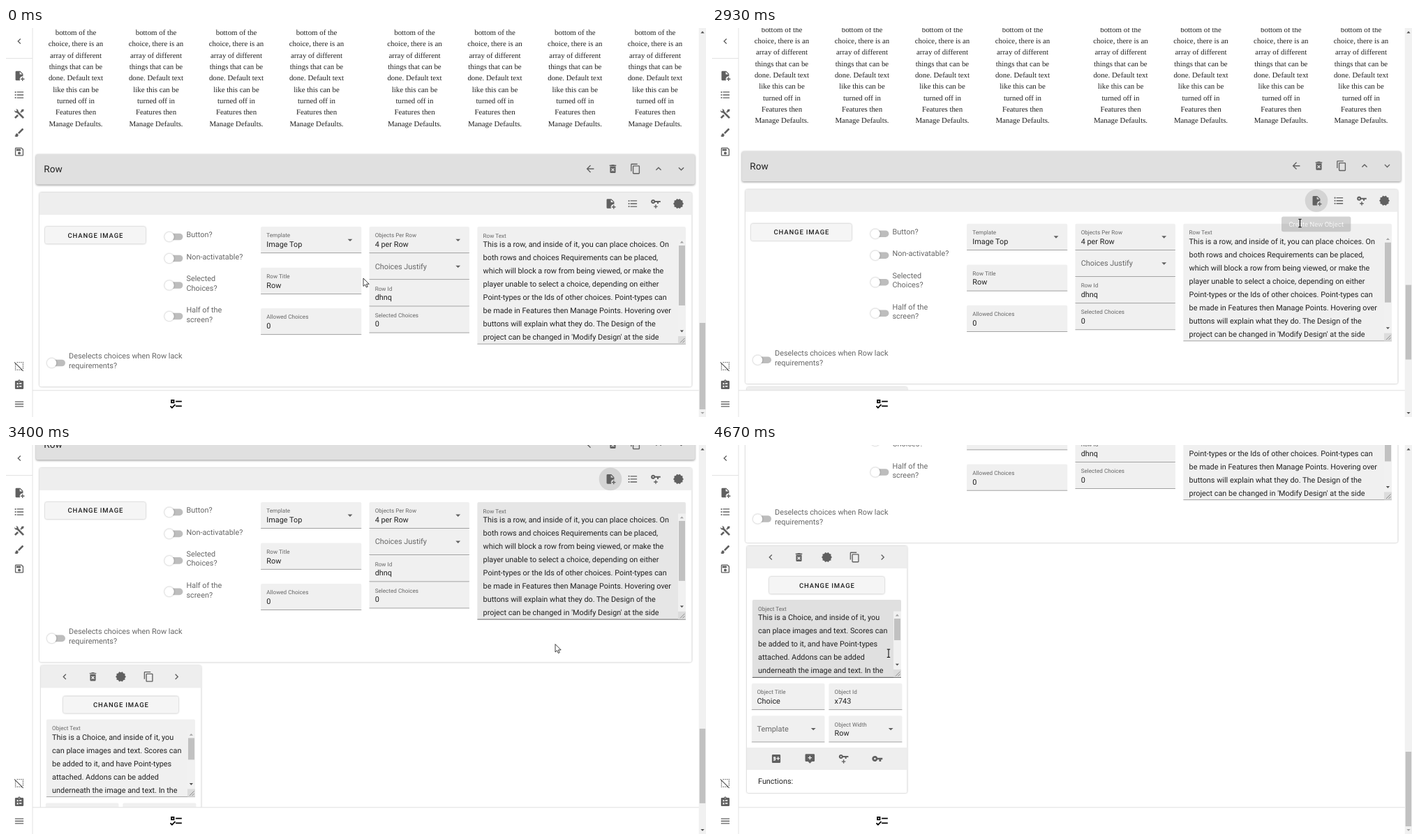
An HTML page for the animation above (5670 ms loop, 1003 by 558 pixels).

```html
<!DOCTYPE html>
<html lang="en">
<head>
<meta charset="utf-8">
<title>Adding a choice to a row</title>
<style>
  html, body { margin: 0; width: 100%; height: 100%; overflow: hidden; background: #fff; }
  svg { display: block; width: 100vw; height: 100vh; cursor: default; user-select: none; }
  text { font: 10.86px Roboto, sans-serif; fill: #212121; white-space: pre; text-rendering: geometricPrecision; }
  .label { fill: #666; }
  .small { font-size: 8.15px; fill: #666; }
  .title { font-size: 13.58px; }
  .button { font-size: 9.5px; font-weight: 500; letter-spacing: .0893em; text-anchor: middle; }
  .serif { font-family: "Liberation Serif", Times, serif; text-anchor: middle; }
  .tip { font-size: 9.5px; fill: #fff; text-anchor: middle; }
  .icon { fill: #606060; fill-rule: evenodd; }
  .low { filter: drop-shadow(0 .7px .9px rgba(0, 0, 0, .34)); }
  .high { filter: drop-shadow(0 1.5px 1.6px rgba(0, 0, 0, .42)); }
</style>
</head>
<body>
<svg id="stage" viewBox="0 0 1003 558" preserveAspectRatio="none"></svg>
<script>
const TICK = 1000 / 15, LOOP = 5670;
const CLICK_TICK = 38, CARD_Y = 374.5;

const ICONS = {
  left: 'M15.41,16.58L10.83,12L15.41,7.41L14,6L8,12L14,18Z',
  right: 'M8.59,16.58L13.17,12L8.59,7.41L10,6L16,12L10,18Z',
  up: 'M7.41,15.41L12,10.83L16.59,15.41L18,14L12,8L6,14Z',
  down: 'M7.41,8.58L12,13.17L16.59,8.58L18,10L12,16L6,10Z',
  menu: 'M3,6H21V8H3ZM3,11H21V13H3ZM3,16H21V18H3Z',
  drop: 'M7,10L12,15L17,10Z',
  back: 'M20,11V13H8L13.5,18.5L12.08,19.92L4.16,12L12.08,4.08L13.5,5.5L8,11Z',
  trash: 'M6,19A2,2 0 0,0 8,21H16A2,2 0 0,0 18,19V7H6ZM8.46,11.88L9.87,10.47L12,12.59L14.12,10.47L15.53,11.88L13.41,14L15.53,16.12L14.12,17.53L12,15.41L9.88,17.53L8.47,16.12L10.59,14ZM15.5,4L14.5,3H9.5L8.5,4H5V6H19V4Z',
  copy: 'M19,21H8V7H19M19,5H8A2,2 0 0,0 6,7V21A2,2 0 0,0 8,23H19A2,2 0 0,0 21,21V7A2,2 0 0,0 19,5M16,1H4A2,2 0 0,0 2,3V17H4V3H16Z',
  list: [6, 12, 18].map(y => `M7,${y - 1}H21V${y + 1}H7ZM2.5,${y}a1.5,1.5 0 0,1 3,0a1.5,1.5 0 0,1 -3,0Z`).join(''),
  save: 'M17,3H5A2,2 0 0,0 3,5V19A2,2 0 0,0 5,21H19A2,2 0 0,0 21,19V7ZM19,19H5V5H16.17L19,7.83ZM12,12a3,3 0 0,0 0,6a3,3 0 0,0 0,-6ZM6,6H15V10H6Z',
  brush: 'M20.71,4.63L19.37,3.29C19,2.9 18.35,2.9 17.96,3.29L9,12.25L11.75,15L20.71,6.04C21.1,5.65 21.1,5 20.71,4.63M7,14A3,3 0 0,0 4,17C4,18.31 2.84,19 2,19C2.92,20.22 4.5,21 6,21A4,4 0 0,0 10,17A3,3 0 0,0 7,14Z',
  add: 'M14,2H6A2,2 0 0,0 4,4V20A2,2 0 0,0 6,22H13.81A6,6 0 0,1 20,13.08V8ZM13,9V3.5L18.5,9ZM23,20H20V23H18V20H15V18H18V15H20V18H23Z',
  tools: 'M21.71,20.29L20.29,21.71A1,1 0 0,1 18.88,21.71L7,9.85A3.81,3.81 0 0,1 6,10A4,4 0 0,1 2.22,4.7L4.76,7.24L7.24,4.76L4.7,2.22A4,4 0 0,1 10,6A3.81,3.81 0 0,1 9.85,7L21.71,18.88A1,1 0 0,1 21.71,20.29M2.29,18.88A1,1 0 0,0 2.29,20.29L3.71,21.71A1,1 0 0,0 5.12,21.71L10.59,16.25L7.76,13.42ZM20,2L16,4V6L13.83,8.17L15.83,10.17L18,8H20L22,4Z',
  unselect: 'M1,4.27L2.28,3L21,21.72L19.73,23L17,20.27V21H15V19H15.73L5,8.27V9H3V7H3.73ZM19,3h2v2h-2ZM15,3h2v2h-2ZM11,3h2v2h-2ZM7,3h2v2H7ZM11,19h2v2h-2ZM7,19h2v2H7ZM3,19h2v2H3ZM3,15h2v2H3ZM19,15h2v2h-2ZM3,11h2v2H3ZM19,11h2v2h-2ZM19,7h2v2h-2Z',
  clipboard: 'M19,3H14.82A3,3 0 0,0 9.18,3H5A2,2 0 0,0 3,5V19A2,2 0 0,0 5,21H19A2,2 0 0,0 21,19V5A2,2 0 0,0 19,3M12,3a1,1 0 0,1 0,2a1,1 0 0,1 0,-2ZM7,8h3v3H7ZM12,8h5v2h-5ZM7,14h3v3H7ZM12,14h5v2h-5Z',
  keyAdd: 'M6.5,3C8.46,3 10.13,4.25 10.74,6H22V9H18V12H15V9H10.74A4.5,4.5 0 1,1 6.5,3M6.5,6a1.5,1.5 0 0,0 0,3a1.5,1.5 0 0,0 0,-3ZM8,17H11V14H13V17H16V19H13V22H11V19H8Z',
  badge: 'M23,12L20.56,9.22L20.9,5.54L17.29,4.72L15.4,1.54L12,3L8.6,1.54L6.71,4.72L3.1,5.53L3.44,9.21L1,12L3.44,14.78L3.1,18.47L6.71,19.29L8.6,22.47L12,21L15.4,22.46L17.29,19.28L20.9,18.46L20.56,14.78Z',
  key: 'M7,14a2,2 0 0,1 0,-4a2,2 0 0,1 0,4M12.6,10A6,6 0 1,0 12.6,14H16V18H20V14H23V10Z',
  tooltip: 'M4,2H20A2,2 0 0,1 22,4V16A2,2 0 0,1 20,18H16L12,22L8,18H4A2,2 0 0,1 2,16V4A2,2 0 0,1 4,2M11,6V9H8V11H11V14H13V11H16V9H13V6Z',
  nine: 'M5,3H19A2,2 0 0,1 21,5V19A2,2 0 0,1 19,21H5A2,2 0 0,1 3,19V5A2,2 0 0,1 5,3M8,8A2,2 0 0,0 6,10V11A2,2 0 0,0 8,13H9V14H6V16H9A2,2 0 0,0 11,14V10A2,2 0 0,0 9,8ZM8,10H9V11H8ZM15,8V10.5H12.5V12.5H15V15H17V12.5H19.5V10.5H17V8Z',
  checks: 'M3,5H9V11H3ZM5,7V9H7V7ZM11,7H21V9H11ZM11,15H21V17H11ZM5,20L1.5,16.5L2.91,15.09L5,17.17L9.59,12.59L11,14Z'
};

const POINTERS = {
  arrow: '<path d="M0,0V11.4L2.6,9L4.3,12.9L6.2,12.1L4.5,8.3H8.2Z" fill="#fff" stroke="#000" stroke-width=".75"/>',
  hand: '<path d="M-1.3,.6Q0,-1 1.3,.6V4.6L5.8,5.6Q7.3,6 7.3,7.5V10L6,14.2H-.6L-3.6,9.6Q-4.6,7.7 -3.1,7.4L-1.3,9Z" fill="#fff" stroke="#000" stroke-width=".8"/><path d="M1.3,4.6V8M3.4,5.2V8M5.4,5.7V8" stroke="#000" stroke-width=".6"/>',
  beam: '<path d="M-2.2,-5.7H2.2M0,-5.7V5.7M-2.2,5.7H2.2" fill="none" stroke="#000"/>'
};

const rect = (x, y, w, h, fill, extra = '') =>
  `<rect x="${x}" y="${y}" width="${w}" height="${h}" fill="${fill}" ${extra}/>`;
const text = (x, y, value, cls = '') => `<text x="${x}" y="${y}" class="${cls}">${value}</text>`;
const icon = (name, x, y, scale = .679, fill = '') =>
  `<path class="icon" d="${ICONS[name]}" transform="translate(${x} ${y}) scale(${scale}) translate(-12 -12)" ${fill && `style="fill:${fill}"`}/>`;
const icons = (y, items) => items.map(([name, x]) => icon(name, x, y)).join('');
const triangle = (x, y, dir, fill) => `<path d="M${x - 2.6},${y + 1.4 * dir}h5.2l-2.6,${-2.8 * dir}Z" fill="${fill}"/>`;

const fields = [];
function box(x, y, w, h, offset = 0) {
  fields.push({ x, y: y + offset, w, h });
  return `<g class="field">${rect(x, y, w, h, '#000', 'rx="2"')}${rect(x, y + h - .7, w, .8, '#000')}</g>`;
}

function input(x, y, w, label, value, select, offset) {
  const inset = x < 100 ? 7.7 : 8.3;
  return box(x, y, w, 38, offset) +
    (value ? text(x + inset, y + 15.4, label, 'small') + text(x + inset, y + 29, value)
           : text(x + inset, y + 22.6, label, 'label')) +
    (select ? icon('drop', x + w - 16.3, y + 19) : '');
}

function textArea(x, y, w, h, label, lines, thumb, offset) {
  const right = x + w;
  return box(x, y, w, h, offset) + text(x + 8.3, y + 15.8, label, 'small') +
    lines.map((line, i) => text(x + 8.3, y + 29.2 + i * 19, line)).join('') +
    rect(right - 11, y + 16.5, 11, h - 28, '#f1f1f1') +
    triangle(right - 5.6, y + 22, 1, '#a3a3a3') +
    rect(right - 10, y + 27, 9, thumb, '#c1c1c1') +
    triangle(right - 5.6, y + h - 18.5, -1, '#505050') +
    rect(right - 11, y + h - 11.5, 11, 11, '#dcdcdc') +
    `<path d="M${right - 8},${y + h - 2}l6.5,-6.5M${right - 4.5},${y + h - 2}l3,-3" stroke="#777" stroke-width=".8"/>`;
}

function toggle(x, y, labelY, ...lines) {
  return rect(x - 5, y - 4.8, 24.4, 9.6, '#bdbdbd', 'rx="4.8"') +
    `<circle class="low" cx="${x}" cy="${y}" r="6.8" fill="#fff"/>` +
    lines.map((line, i) => text(x + 24.5, labelY + i * 13.6, line, 'label')).join('');
}

const imageButton = (x, y, w) =>
  rect(x, y, w, 24.4, '#f5f5f5', 'rx="2.7" class="low"') + text(x + w / 2 + .4, y + 15.6, 'CHANGE IMAGE', 'button');

const choiceText = ['bottom of the', 'choice, there is an', 'array of different', 'things that can be',
  'done. Default text', 'like this can be', 'turned off in', 'Features then', 'Manage Defaults.'];
const rowText = ['This is a row, and inside of it, you can place choices. On',
  'both rows and choices Requirements can be placed,', 'which will block a row from being viewed, or make the',
  'player unable to select a choice, depending on either', 'Point-types or the Ids of other choices. Point-types can',
  'be made in Features then Manage Points. Hovering over', 'buttons will explain what they do. The Design of the',
  "project can be changed in 'Modify Design' at the side"];
const objectText = ['This is a Choice, and inside of it, you', 'can place images and text. Scores can',
  'be added to it, and have Point-types', 'attached. Addons can be added', 'underneath the image and text. In the'];

const columns = [100, 215, 330, 445, 585.5, 700.5, 815.3, 930]
  .map(x => choiceText.map((line, i) => text(x, 10.1 + i * 16.3, line, 'serif')).join('')).join('');

const rowEditor =
  rect(43, 181, 944, 43.4, '#e0e0e0', 'rx="2.7" class="high"') + text(54.3, 206.9, 'Row', 'title') +
  icons(202, [['back', 837], ['trash', 869.5], ['copy', 902], ['up', 935], ['down', 967.5]]) +
  rect(48, 236, 934.5, 278.5, '#fff', 'rx="2.7" class="low"') + rect(48, 236, 934.5, 32, '#eee') +
  '<circle id="halo" cx="866" cy="252" r="16.3"/>' +
  icons(252, [['add', 866], ['list', 898], ['keyAdd', 931], ['badge', 963.5]]) +
  imageButton(56, 285, 144) +
  toggle(234, 299.5, 300.4, 'Button?') + toggle(234, 330.5, 331.8, 'Non-activatable?') +
  toggle(234, 369, 363, 'Selected', 'Choices?') + toggle(234, 413.5, 408.2, 'Half of the', 'screen?') +
  toggle(65.5, 480.5, 474.4, 'Deselects choices when Row lack', 'requirements?') +
  input(365, 285, 144.3, 'Template', 'Image Top', true) + input(365, 343.7, 144.3, 'Row Title', 'Row') +
  input(365, 402, 144.3, 'Allowed Choices', '0') +
  input(520.4, 285, 143.6, 'Objects Per Row', '4 per Row', true) + input(520.4, 323, 143.6, 'Choices Justify', '', true) +
  input(520.4, 361.3, 143.6, 'Row Id', 'dhnq') + input(520.4, 399.4, 143.6, 'Selected Choices', '0') +
  textArea(675.3, 285, 298.7, 168.5, 'Row Text', rowText, 86);

const objectCard = `<g id="card" transform="translate(0 ${CARD_Y})">` +
  rect(50, 145, 229.5, 354, '#fff', 'rx="2" class="low"') + rect(50, 145, 229.5, 32, '#eee') +
  icons(161, [['left', 84], ['trash', 124.5], ['badge', 164.5], ['copy', 204.5], ['right', 244.5]]) +
  imageButton(82, 189, 165) +
  textArea(57.8, 222, 213.2, 111.6, 'Object Text', objectText, 31, CARD_Y) +
  input(56.8, 342, 104.7, 'Object Title', 'Choice', false, CARD_Y) + input(167.3, 342, 105.2, 'Object Id', 'x743', false, CARD_Y) +
  input(56.8, 388.3, 104.7, 'Template', '', true, CARD_Y) + input(167.3, 388.3, 105.2, 'Object Width', 'Row', true, CARD_Y) +
  rect(50, 434, 229.5, 32, '#eee') +
  icons(450, [['nine', 92], ['tooltip', 140.3], ['keyAdd', 188.6], ['key', 236.8]]) +
  text(66, 486, 'Functions:') + '</g>';

const tip = '<g id="tip">' + rect(816, 274.7, 99.4, 21.8, '#616161', 'rx="2.7"') +
  text(865.7, 289.1, 'Create New Object', 'tip') + '</g>';

const frame =
  rect(38, 519.5, 955, 39, '#fff') + rect(38, 519.5, 955, .8, '#d8d8d8') + icon('checks', 244, 539, .87, '#000') +
  rect(0, 0, 38, 558, '#fff') + rect(37.6, 0, .8, 558, '#dcdcdc') + rect(0, 43, 38, .8, '#dcdcdc') +
  [['left', 19], ['add', 68.5], ['list', 96], ['tools', 123], ['brush', 150], ['save', 177.5],
    ['unselect', 485], ['clipboard', 512], ['menu', 539.5]].map(([name, y]) => icon(name, 19, y)).join('') +
  rect(992.7, 0, 10.3, 558, '#f1f1f1') + triangle(998, 6, 1, '#505050') +
  '<g id="pageDown">' + triangle(998, 552.3, -1, 'inherit') + '</g>' + rect(993.7, 0, 8.4, 107, '#c1c1c1', 'id="thumb"');

const byId = id => document.getElementById(id);
byId('stage').innerHTML = `<g id="page">${columns}${rowEditor}${objectCard}${tip}</g>${frame}<g id="pointer"></g>`;
const fieldNodes = [...document.querySelectorAll('.field')];
const pageDownArrow = byId('pageDown').firstChild;

// Key points are given in ticks of 1/15 s.
const scrollPath = [[43, 0], [44, 4.3], [46, 42], [49, 130.5], [54, 312], [55, 345], [56, 363], [58, CARD_Y]];
const pointerPath = [[8, 512, 359], [11, 610, 322], [14, 728, 283], [17, 783, 265], [18, 824, 259], [20, 860, 252],
  [21, 866.8, 250], [41, 866.8, 250], [44, 842.5, 280], [49, 803, 282], [55, 755, 293], [58, 674, 293],
  [59, 674, 293], [60, 650, 293], [64, 330, 296], [65, 276, 298], [66, 259, 298.5], [68, 253, 298.8]];
const tipPath = [[33, 0], [35, 1], [42, 1], [44, .3], [45, 0]];

function along(path, tick) {
  const next = path.findIndex(point => point[0] > tick);
  if (next === 0) return path[0].slice(1);
  if (next < 0) return path.at(-1).slice(1);
  const a = path[next - 1], b = path[next], k = (tick - a[0]) / (b[0] - a[0]);
  return a.slice(1).map((value, i) => value + (b[i + 1] - value) * k);
}

function hoverAmount(field, tick) {
  let amount = 0;
  for (let n = 8; n <= tick; n++) {
    const [x, y] = along(pointerPath, n), pageY = y + along(scrollPath, n)[0];
    const inside = x > field.x && x < field.x + field.w && pageY > field.y && pageY < field.y + field.h;
    amount = Math.min(1, Math.max(0, amount + (inside ? .25 : -.34)));
  }
  return amount;
}

function pointerKind(n) {
  if (n >= 20 && n <= 42) return 'hand';
  return n === 12 || n === 13 || (n >= 44 && n <= 46) || n >= 66 ? 'beam' : 'arrow';
}

function draw() {
  const tick = Math.floor((performance.now() % LOOP + 3.4) / TICK);
  const [scroll] = along(scrollPath, tick), [x, y] = along(pointerPath, tick);
  const added = tick >= CLICK_TICK;

  byId('page').setAttribute('transform', `translate(0 ${-scroll})`);
  byId('card').style.display = added ? '' : 'none';
  byId('tip').style.opacity = along(tipPath, tick)[0] * .92;
  byId('halo').style.opacity = tick < 33 ? 0 : added ? .11 : .08;

  byId('thumb').setAttribute('y', added ? 367.7 + .193 * scroll : 423);
  byId('thumb').setAttribute('height', added ? 107 : 124);
  pageDownArrow.setAttribute('fill', added && scroll < CARD_Y ? '#505050' : '#a3a3a3');

  fieldNodes.forEach((node, i) => {
    const amount = hoverAmount(fields[i], tick);
    node.children[0].style.opacity = .06 + .06 * amount;
    node.children[1].style.opacity = .42 + .4 * amount;
  });

  byId('pointer').innerHTML = POINTERS[pointerKind(tick)];
  byId('pointer').setAttribute('transform', `translate(${x} ${y})`);
  requestAnimationFrame(draw);
}
draw();
</script>
</body>
</html>
```
